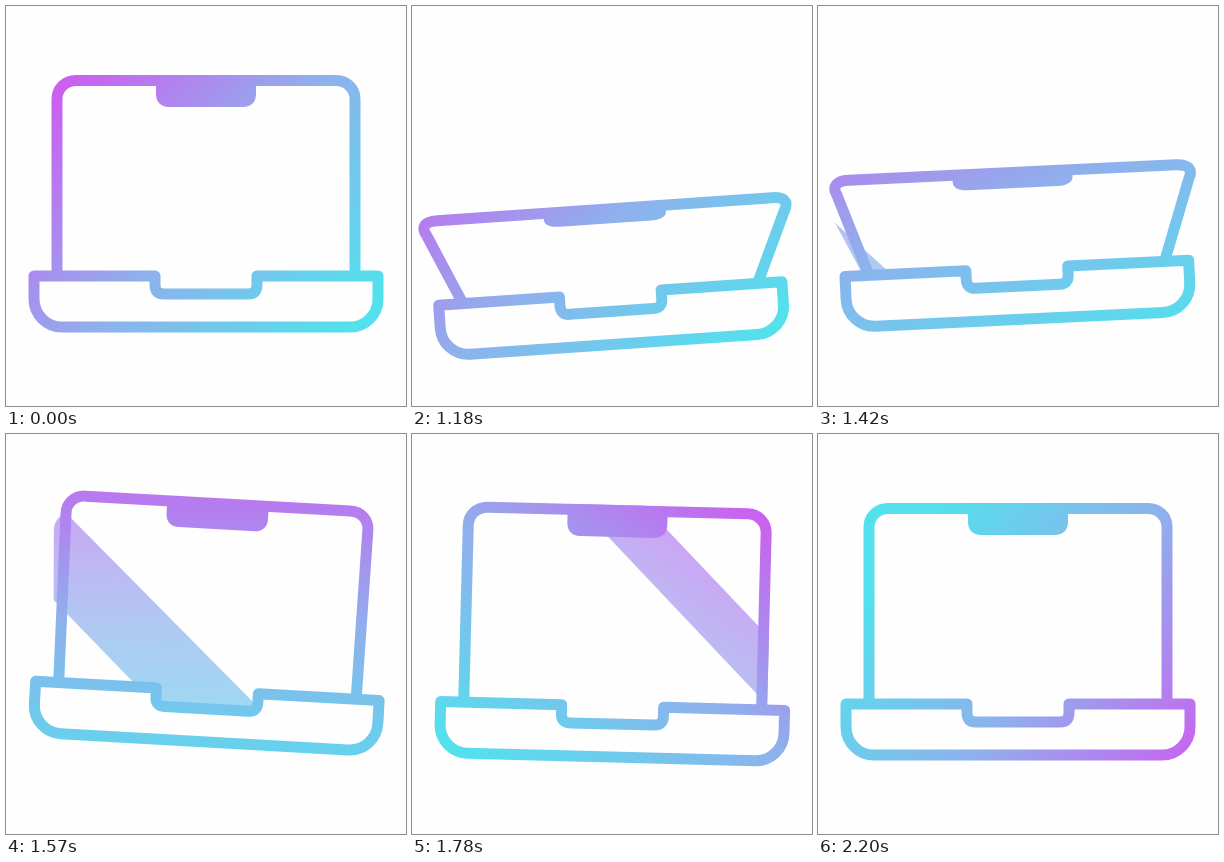
An HTML page without scripts that plays this animation: 400x400 px, repeating every 2.23 s.

```html
<!DOCTYPE html>
<html lang="en">
<head>
<meta charset="utf-8">
<title>Laptop</title>
<style>
  html, body { margin: 0; width: 100%; height: 100%; overflow: hidden; background: #fefefe; }
  svg { display: block; width: 100%; height: 100%; }

  .laptop, .lid, .notch, .shine {
    animation: 2230ms cubic-bezier(.33, 0, .67, 1) infinite;
  }
  .laptop { transform-origin: 200px 295px; animation-name: tilt, bob; }
  .lid { animation-name: lid; }
  .notch { animation-name: notch; }
  .shine { animation-name: shine; animation-timing-function: linear; }
  .late { animation-delay: 40ms; }

  .line { fill: none; stroke: url(#glow); stroke-width: 11; stroke-linejoin: round; }
  .fill { fill: url(#glow); }

  @keyframes tilt {
    0%, 44.8% { rotate: 0deg; }
    54.7%, 60.5% { rotate: -4.3deg; }
    71.7% { rotate: 3.5deg; }
    83% { rotate: 1deg; }
    99.1%, 100% { rotate: 0deg; }
  }
  @keyframes bob {
    0%, 44.8% { translate: 0 0; }
    54.7% { translate: 0 19px; }
    67.9% { translate: 0 -16px; }
    78% { translate: 0 2px; }
    99.1%, 100% { translate: 0 0; }
  }
  @keyframes lid {
    0%, 44.6%, 72.2%, 100% {
      d: path("M51 267 L51 93 C51 83 59 74.5 70 74.5 L330 74.5 C341 74.5 349 83 349 93 L349 267");
    }
    54%, 61.2% {
      d: path("M51 267 L19.5 203 C14 194 19 189.5 31 189.5 L369 189.5 C381 189.5 386 194 380.5 203 L349 267");
    }
  }
  @keyframes notch {
    0%, 44.6%, 72.2%, 100% {
      d: path("M150 74 L150 88 C150 96 155 101 163 101 L237 101 C245 101 250 96 250 88 L250 74 Z");
    }
    54%, 61.2% {
      d: path("M138.5 189 L138.5 196 C138.5 201 145 203.5 154 203.5 L246 203.5 C255 203.5 261.5 201 261.5 196 L261.5 189 Z");
    }
  }
  @keyframes shine {
    0%, 60% { d: path("M-200 60 L30 290 L-70 290 L-300 60 Z"); }
    63.7% { d: path("M-136 60 L94 290 L-6 290 L-236 60 Z"); }
    70.4% { d: path("M3 60 L258 290 L151 290 L-99 60 Z"); }
    79.8% { d: path("M216 60 L446 290 L378 290 L149 60 Z"); }
    88.8%, 100% { d: path("M400 60 L630 290 L560 290 L330 60 Z"); }
  }
</style>
</head>
<body>
<svg viewBox="0 0 400 400">
  <defs>
    <linearGradient id="glow" gradientUnits="userSpaceOnUse" x1="-185" y1="0" x2="185" y2="0"
      gradientTransform="translate(200 200) rotate(42)">
      <stop stop-color="#cb5ff0"/>
      <stop offset=".5" stop-color="#8fb0ec"/>
      <stop offset="1" stop-color="#52e1ed"/>
      <animateTransform attributeName="gradientTransform" type="translate"
        dur="2230ms" repeatCount="indefinite" keyTimes="0;.637;.798;.987;1"
        values="200 200;200 200;212 208;232 225;232 225"/>
      <animateTransform attributeName="gradientTransform" type="rotate" additive="sum"
        dur="2230ms" repeatCount="indefinite" keyTimes="0;.448;.529;.637;.704;.798;.987;1"
        values="42;42;54;72;88;123;218;225"/>
    </linearGradient>
    <mask id="screen" maskUnits="userSpaceOnUse" x="0" y="0" width="400" height="400">
      <path class="lid late" fill="#fff" stroke="#fff" stroke-width="11"
        d="M51 267 L51 93 C51 83 59 74.5 70 74.5 L330 74.5 C341 74.5 349 83 349 93 L349 267"/>
      <rect x="149" y="262" width="102" height="26" rx="9" fill="#fff"/>
    </mask>
  </defs>

  <g class="laptop">
    <g mask="url(#screen)">
      <path class="shine fill" opacity=".7" d="M-200 60 L30 290 L-70 290 L-300 60 Z"/>
    </g>
    <path class="lid line"
      d="M51 267 L51 93 C51 83 59 74.5 70 74.5 L330 74.5 C341 74.5 349 83 349 93 L349 267"/>
    <path class="notch fill"
      d="M150 74 L150 88 C150 96 155 101 163 101 L237 101 C245 101 250 96 250 88 L250 74 Z"/>
    <path class="line"
      d="M28 270 H149 V279 Q149 288 158 288 H242 Q251 288 251 279 V270 H372 V293 A28 28 0 0 1 344 321 H56 A28 28 0 0 1 28 293 Z"/>
  </g>
</svg>
</body>
</html>
```
